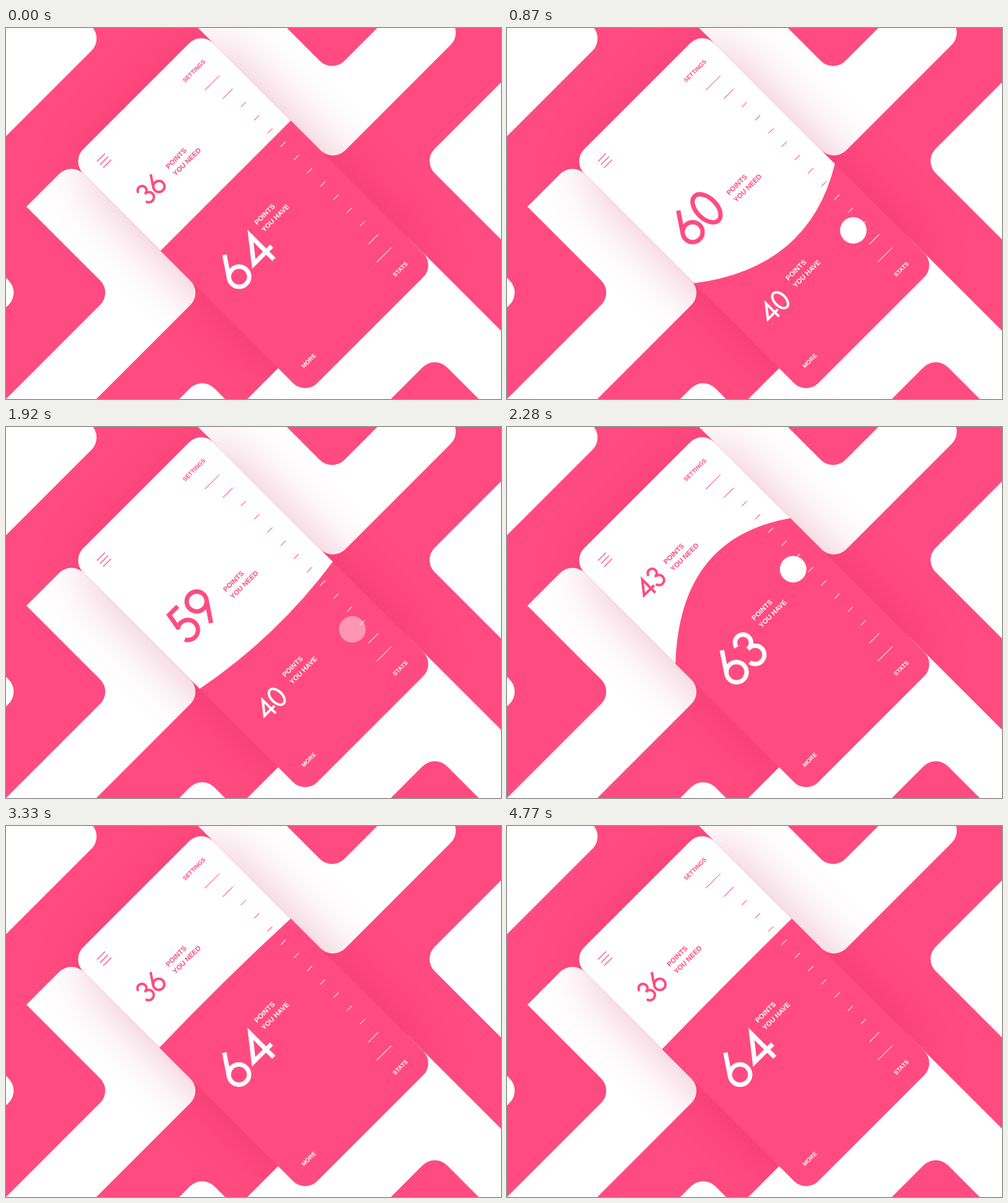
Animation, 800 px wide and 600 px high, one loop 4.8 s. Source, as an HTML page with a canvas:

```html
<!DOCTYPE html>
<html lang="en">
<head>
<meta charset="utf-8">
<title>Points</title>
<style>
  html, body { margin: 0; width: 100%; height: 100%; overflow: hidden; background: #ff4b81; }
  canvas { display: block; width: 800px; height: 600px; }
</style>
</head>
<body>
<canvas id="stage" width="800" height="600"></canvas>
<script>
const LOOP = 4800, PINK = '#ff4b81', WHITE = '#fff', RADIUS = 28;
const S = Math.SQRT1_2;   // diagonal units (x - y, x + y) to rotated pixels
const LEFT = -110.5, RIGHT = 310.5, TOP = 320.5, BOTTOM = 1077.5;
const DOWN = { start: 150, release: 850 }, UP = { start: 1920, release: 2580 };
const DRAG_TIME = 410;
const canvas = document.getElementById('stage');
const ctx = canvas.getContext('2d');
const backdrop = document.createElement('canvas');
backdrop.width = 800;
backdrop.height = 600;

const clamp = x => Math.max(0, Math.min(1, x));
const progress = (t, from, to) => clamp((t - from) / (to - from));
const easeInOut = x => x < .5 ? 4 * x ** 3 : 1 - 4 * (1 - x) ** 3;

const pull = (t, { start }) => easeInOut(progress(t, start, start + DRAG_TIME));
const drag = t => pull(t, DOWN) - pull(t, UP);
const count = t => progress(t, DOWN.start - 20, 660) - progress(t, UP.start, 2460);

// Stretches while the finger holds, then rings out after the release
function spring(t, gesture) {
  const free = t - gesture.release;
  if (free < 0) return 75 * Math.sin(pull(t, gesture) * Math.PI / 2);
  return 75 * Math.exp(-free / 800) * Math.cos(free * 2 * Math.PI / 1000);
}
const wobble = t => spring(t, DOWN) - spring(t, UP);
const level = t => 610 + 135 * drag(t);

// Left, middle and right heights of the divider; the far side trails the finger
function divider(t) {
  const late = t - 65;
  const left = level(late) - .4 * wobble(late);
  const right = level(t) + .06 * wobble(t);
  return { left, right, middle: (left + right) / 2 + wobble(t) };
}

const tilt = c => c.rotate(-Math.PI / 4);

function block(c, color, p0, q0, p1, q1, corners) {
  c.beginPath();
  c.roundRect(p0 * S, q0 * S, (p1 - p0) * S, (q1 - q0) * S, corners.map(on => on * RADIUS));
  c.fillStyle = color;
  c.fill();
}

function paintBackdrop() {
  const c = backdrop.getContext('2d');
  c.fillStyle = PINK;
  c.fillRect(0, 0, 800, 600);
  tilt(c);
  block(c, WHITE, -400, -600, 141, 175, [0, 0, 1, 0]);
  block(c, WHITE, RIGHT, -200, 731, 746, [0, 0, 1, 1]);
  block(c, PINK, 454, -400, 1200, 600, [0, 0, 0, 1]);
  block(c, WHITE, 458, 888, 1400, 1500, [1, 0, 0, 0]);
  block(c, WHITE, -1000, 322, LEFT, 746, [0, 1, 1, 0]);
  block(c, PINK, -1000, 200, -256, 600, [0, 0, 1, 0]);
  block(c, WHITE, -1000, 0, -404, 452, [0, 0, 1, 0]);
  block(c, WHITE, -1000, 880, -246, 1600, [0, 1, 0, 0]);
  c.save();
  c.shadowColor = 'rgba(200, 10, 70, .3)';
  c.shadowBlur = 90;
  block(c, PINK, LEFT + 4, 350, RIGHT - 4, 1040, [1, 1, 1, 1]);
  c.restore();
  block(c, WHITE, -600, 990, RIGHT, 1800, [0, 0, 0, 0]);
  block(c, PINK, -400, 1222, 164, 1800, [0, 1, 0, 0]);
}

const line = (...pts) => pts.forEach(([x, y], i) => i ? ctx.lineTo(x, y) : ctx.moveTo(x, y));
const ring = (x, y, rx, ry = rx) => {
  ctx.moveTo(x + rx, y);
  ctx.ellipse(x, y, rx, ry, 0, 0, 2 * Math.PI);
};

// Numerals one unit high: [width, path]
const six = () => { line([.45, .02], [.101, .539]); ring(.317, .683, .26); };
const numerals = [
  [.64, () => ring(.32, .5, .265, .443)],
  [.3, () => line([.02, .16], [.22, .07], [.22, 1])],
  [.58, () => { ctx.arc(.29, .29, .232, Math.PI, Math.PI * 2.2); line([.478, .426], [.1, .943], [.57, .943]); }],
  [.58, () => {
    ctx.arc(.28, .264, .207, -Math.PI * .95, Math.PI / 2);
    ctx.moveTo(.25, .471);
    ctx.arc(.28, .707, .236, -Math.PI / 2, Math.PI * .95);
  }],
  [.76, () => line([.57, 1], [.57, .15], [.12, .72], [.77, .72])],
  [.58, () => { line([.52, .058], [.2, .058], [.13, .45]); ctx.arc(.27, .68, .263, -Math.PI * .67, Math.PI * .85); }],
  [.634, six],
  [.56, () => line([.02, .058], [.47, .058], [.13, 1])],
  [.6, () => { ring(.3, .26, .2); ring(.3, .7, .243); }],
  [.634, () => {
    ctx.translate(.634, 1);
    ctx.rotate(Math.PI);
    six();
  }]
];

function drawNumber(value, x, top, height, color) {
  ctx.save();
  ctx.translate(x, top);
  ctx.scale(height, height);
  ctx.strokeStyle = color;
  ctx.lineWidth = .115;
  for (const digit of String(Math.floor(value))) {
    const [width, path] = numerals[digit];
    ctx.save();
    ctx.beginPath();
    path();
    ctx.stroke();
    ctx.restore();
    ctx.translate(width + .06, 0);
  }
  ctx.restore();
}

function text(str, x, y, size, color, align = 'left') {
  ctx.font = `bold ${size}px "Liberation Sans", Arial, sans-serif`;
  ctx.textAlign = align;
  ctx.fillStyle = color;
  ctx.fillText(str, x, y);
}

function drawTicks(color) {
  ctx.beginPath();
  for (let i = 0; i < 14; i++) {
    const length = 11.5 + 11 * Math.max(0, 2 - Math.min(i, 13 - i));
    const y = (422 + 42.77 * i) * S, x = 268 * S;
    line([x - length, y], [x, y]);
  }
  ctx.strokeStyle = color;
  ctx.lineWidth = 1;
  ctx.stroke();
}

// Fills the card from one end up to the divider
function drawPanel({ left, middle, right }, end, fill, ink) {
  ctx.save();
  ctx.beginPath();
  line([LEFT * S, end * S], [RIGHT * S, end * S], [RIGHT * S, right * S]);
  ctx.quadraticCurveTo((LEFT + RIGHT) / 2 * S, (2 * middle - (left + right) / 2) * S, LEFT * S, left * S);
  ctx.closePath();
  ctx.fillStyle = fill;
  ctx.fill();
  ctx.clip();
  drawTicks(ink);
  ctx.restore();
}

function drawMenu() {
  ctx.beginPath();
  for (const q of [363, 373, 383]) line([-69 * S, q * S], [-43 * S, q * S]);
  ctx.strokeStyle = PINK;
  ctx.lineWidth = 1.3;
  ctx.stroke();
}

function drawScores(t) {
  const k = drag(t), dy = 91 * k + .1 * wobble(t);
  const needSize = 35 + 27 * k, haveSize = 63 - 28 * k;
  drawNumber(36 + 24 * count(t), -40 - k, 367 + dy - needSize, needSize, PINK);
  text('POINTS', 24.5 + 38 * k, 347.5 + dy, 11.25, PINK);
  text('YOU NEED', 24.5 + 38 * k, 363.5 + dy, 11.25, PINK);
  drawNumber(64 - 24 * k, -38 - k, 507.7 + dy, haveSize, WHITE);
  text('POINTS', 61.5 - 29 * k, 512.5 + dy, 11.25, WHITE);
  text('YOU HAVE', 61.5 - 29 * k, 529 + dy, 11.25, WHITE);
}

function drawTouch(t) {
  for (const { start, release } of [DOWN, UP]) {
    const fade = progress(t, release + 60, release + 220);
    const alpha = progress(t, start - 40, start + 60) * (1 - fade);
    if (!alpha) continue;
    ctx.globalAlpha = alpha;
    ctx.beginPath();
    ring(232.5 * S, (691 + 196 * drag(t)) * S, 21.5 + 5 * fade);
    ctx.fillStyle = WHITE;
    ctx.fill();
  }
  ctx.globalAlpha = 1;
}

function draw(t) {
  ctx.drawImage(backdrop, 0, 0);
  ctx.save();
  tilt(ctx);
  ctx.beginPath();
  ctx.roundRect(LEFT * S, TOP * S, (RIGHT - LEFT) * S, (BOTTOM - TOP) * S, RADIUS);
  ctx.clip();
  const edge = divider(t);
  drawPanel(edge, BOTTOM, PINK, WHITE);
  drawPanel(edge, TOP, WHITE, PINK);
  drawMenu();
  text('SETTINGS', 268 * S, 378 * S, 9.5, PINK, 'right');
  text('STATS', 268 * S, 1032 * S, 9.5, WHITE, 'right');
  text('MORE', -69 * S, 1032 * S, 9.5, WHITE);
  drawScores(t);
  drawTouch(t);
  ctx.restore();
}

paintBackdrop();
const began = performance.now();
function frame() {
  draw((performance.now() - began) % LOOP);
  requestAnimationFrame(frame);
}
frame();
</script>
</body>
</html>
```
